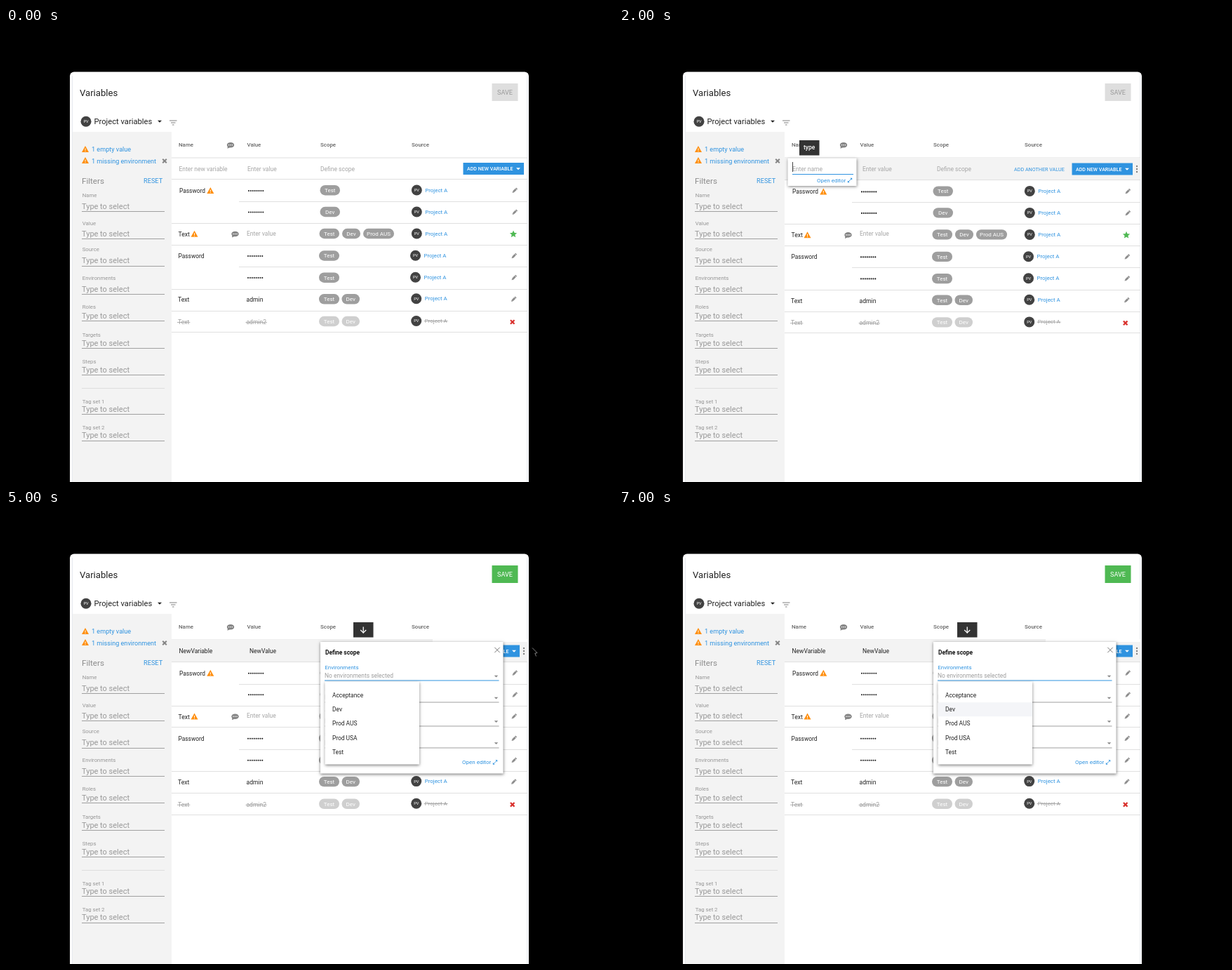
Animation, 865 px wide and 647 px high, one loop 8000 ms. Source, as an HTML page with a canvas:

```html
<!DOCTYPE html>
<html lang="en">
<head>
<meta charset="utf-8">
<title>Variables editor</title>
<style>
html, body { margin: 0; width: 100%; height: 100%; overflow: hidden; background: #000; }
canvas { display: block; }
</style>
</head>
<body>
<canvas id="stage" width="865" height="647"></canvas>
<script>
const ctx = document.getElementById('stage').getContext('2d');
const BLUE = '#2f93e0', GREEN = '#4fb953', ORANGE = '#ff8f0f', RED = '#d9302c';
const INK = '#222', GREY = '#9e9e9e', HINT = '#a6a6a6', RULE = '#e0e0e0', DARK = '#424242';
const STEP = 1000, STEPS = 8;

// y is the middle of the capitals
function text(str, x, y, size, color, { weight = 400, align = 'left', strike = false } = {}) {
  ctx.font = `${weight} ${size}px Roboto, sans-serif`;
  ctx.textAlign = align;
  ctx.fillStyle = color;
  ctx.fillText(str, x, y + size * 0.35);
  if (strike) rect(x - 1, y, ctx.measureText(str).width + 2, 0.8, color);
}

function rect(x, y, w, h, color) {
  ctx.fillStyle = color;
  ctx.fillRect(x, y, w, h);
}

function rounded(x, y, w, h, r, color) {
  ctx.fillStyle = color;
  ctx.beginPath();
  ctx.roundRect(x, y, w, h, r);
  ctx.fill();
}

function dot(x, y, r, color) {
  ctx.fillStyle = color;
  ctx.beginPath();
  ctx.arc(x, y, r, 0, Math.PI * 2);
  ctx.fill();
}

function trace(points) {
  ctx.beginPath();
  points.forEach(([x, y]) => ctx.lineTo(x, y));
}

function polygon(points, color) {
  ctx.fillStyle = color;
  trace(points);
  ctx.fill();
}

function line(x1, y1, x2, y2, color, width = 1) {
  ctx.strokeStyle = color;
  ctx.lineWidth = width;
  trace([[x1, y1], [x2, y2]]);
  ctx.stroke();
}

function at(x, y, draw) {
  ctx.save();
  ctx.translate(x, y);
  draw();
  ctx.restore();
}

function card(x, y, w, h) {
  ctx.save();
  ctx.shadowColor = 'rgba(0,0,0,.5)';
  ctx.shadowBlur = 4;
  ctx.shadowOffsetY = 1;
  rect(x, y, w, h, '#fff');
  ctx.restore();
}

function caret(x, y, color, w = 6) {
  polygon([[x - w / 2, y - w / 4], [x + w / 2, y - w / 4], [x, y + w / 4]], color);
}

function cross(x, y, r, color, width) {
  line(x - r, y - r, x + r, y + r, color, width);
  line(x + r, y - r, x - r, y + r, color, width);
}

function warning(x, y) {
  polygon([[x, y - 5], [x + 5, y + 4], [x - 5, y + 4]], ORANGE);
  rect(x - 0.5, y - 1.5, 1, 2.7, '#fff');
  rect(x - 0.5, y + 2, 1, 1, '#fff');
}

function comment(x, y) {
  ctx.fillStyle = '#858585';
  ctx.beginPath();
  ctx.ellipse(x, y - 0.5, 5.2, 3.8, 0, 0, Math.PI * 2);
  ctx.fill();
  polygon([[x - 4, y], [x - 1, y + 3], [x - 4.5, y + 4.5]], '#858585');
  for (const dx of [-2.5, 0, 2.5]) dot(x + dx, y - 0.5, 0.8, '#fff');
}

function pencil(x, y) {
  at(x, y, () => {
    ctx.rotate(-Math.PI / 4);
    rect(-2.6, -1.4, 5, 2.8, '#8c8c8c');
    rect(2.8, -1.4, 1.6, 2.8, '#8c8c8c');
    polygon([[-2.6, -1.4], [-2.6, 1.4], [-4.8, 0]], '#8c8c8c');
  });
}

function star(x, y) {
  const points = Array.from({ length: 10 }, (_, i) => {
    const a = i * Math.PI / 5 - Math.PI / 2, r = i % 2 ? 2.5 : 5.4;
    return [x + r * Math.cos(a), y + r * Math.sin(a)];
  });
  polygon(points, GREEN);
}

function badge(x, y) {
  dot(x, y, 7.5, DARK);
  text('PV', x, y, 5.6, '#fff', { align: 'center' });
}

function chip(label, x, y, w, color) {
  rounded(x, y - 7.2, w, 14.4, 7.2, color);
  text(label, x + w / 2, y, 8, '#fff', { align: 'center' });
}

function secret(x, y) {
  for (let i = 0; i < 8; i++) dot(x + 1 + i * 2.9, y, 1.05, INK);
}

function openEditor(x, y) {
  text('Open editor', x, y, 8, BLUE);
  at(x + 47, y, () => {
    line(-2.5, 2.5, 2.5, -2.5, BLUE, 0.9);
    polygon([[3.2, -3.2], [3.2, -0.4], [0.4, -3.2]], BLUE);
    polygon([[-3.2, 3.2], [-3.2, 0.4], [-0.4, 3.2]], BLUE);
  });
}

// Black arrow with a thin light rim on its right side
function pointer(x, y) {
  at(x, y, () => {
    const rim = [[1, 0.5], [8, 7.6], [4.8, 8.2], [6.5, 12.5]];
    polygon([[0.5, 0.5], ...rim, [4.8, 13.2], [3.1, 9], [0.5, 11.3]], '#000');
    trace(rim);
    ctx.strokeStyle = '#bbb';
    ctx.lineWidth = 0.7;
    ctx.stroke();
  });
}

function key(label, x, y = 160) {
  rect(x, y, 28.5, 21.5, '#333');
  if (label !== 'down') {
    text(label, x + 14.2, y + 10.5, 8.5, '#fff', { weight: 500, align: 'center' });
    return;
  }
  const cx = x + 14.2, cy = y + 11;
  line(cx, cy - 4.5, cx, cy + 4, '#fff', 1.3);
  line(cx - 4, cy, cx + 0.4, cy + 4.4, '#fff', 1.3);
  line(cx + 4, cy, cx - 0.4, cy + 4.4, '#fff', 1.3);
}

function field(label, labelY, inputY, ruleY) {
  text(label, 108.7, labelY, 7.8, '#969696');
  text('Type to select', 108, inputY, 11, '#999');
  rect(108, ruleY, 118, 1, '#a0a0a0');
}

function sidebar() {
  rect(95, 148, 141, 499, '#f3f3f3');
  warning(113, 173);
  text('1 empty value', 122, 173, 9.1, BLUE);
  warning(113, 189);
  text('1 missing environment', 122, 189.5, 9.1, BLUE);
  cross(226, 189.5, 2.8, '#858585', 2);
  text('Filters', 108, 218, 11.6, '#8c8c8c');
  text('RESET', 196, 218, 9.2, BLUE);
  field('Name', 238.5, 254, 261);
  field('Value', 278, 293.5, 300);
  field('Source', 315.5, 331.5, 339);
  field('Environments', 356, 372, 379);
  field('Roles', 397.5, 410, 417);
  field('Targets', 437, 449, 456);
  field('Steps', 475, 487.5, 494);
  rect(108, 513, 118, 1, '#dedede');
  field('Tag set 1', 532, 543, 550);
  field('Tag set 2', 569.5, 580.5, 588);
}

function header(changed) {
  text('Variables', 105, 92.5, 13.1, INK);
  rect(692.5, 79, 37, 25, changed ? GREEN : '#dedede');
  text('SAVE', 711, 91.5, 9.1, changed ? '#fff' : '#999', { align: 'center' });
  badge(114, 133.3);
  text('Project variables', 125.5, 133, 11.2, INK);
  caret(219, 133.3, INK);
  rect(233, 131.5, 10.5, 1, '#808080');
  rect(235, 134.5, 6.5, 1, '#808080');
  rect(237, 137.5, 2.5, 1, '#808080');
}

function columns() {
  const style = { weight: 500 };
  text('Name', 246, 166.5, 7.9, '#666', style);
  comment(320, 167.3);
  text('Value', 343.5, 166.5, 7.9, '#666', style);
  text('Scope', 448, 166.5, 7.9, '#666', style);
  text('Source', 578, 166, 8, '#666', style);
}

function addButton(x, y) {
  rect(x, y, 86.5, 17, BLUE);
  text('ADD NEW VARIABLE', x + 5.5, y + 8.6, 7.1, '#fff', { weight: 500 });
  caret(x + 78.5, y + 8.7, '#fff');
}

function entryRow(step) {
  rect(236, 184.5, 507, 1, RULE);
  if (step < 2) {
    text('Enter new variable', 246.5, 201, 8.5, HINT);
    text('Enter value', 344, 201, 8.5, HINT);
    text('Define scope', 448, 201, 8.5, HINT);
    addButton(651.5, 192);
    rect(236, 215, 507, 1, RULE);
    return;
  }
  rect(236, 185, 507, 31.5, '#f3f3f3');
  if (step > 4) rect(608, 184, 135, 4, '#fff');
  rect(236, 216, 507, 1, RULE);
  if (step > 2) text('NewVariable', 246.5, 201.5, 8.5, INK);
  if (step > 3) text('NewValue', 347, 201.5, 8.5, INK);
  else text('Enter value', 347, 201.5, 8.5, HINT);
  text('Define scope', 453, 201.5, 8.5, HINT);
  text('ADD ANOTHER VALUE', 563, 201.5, 7.2, BLUE);
  addButton(645.5, 192.5);
  for (const y of [197, 201, 205]) dot(738, y, 1.2, '#808080');
}

function source(x, y, removed) {
  badge(x, y);
  text('Project A', x + 12, y - 0.2, 7.9, removed ? GREY : BLUE, { strike: removed });
}

function rows(step) {
  const d = step < 2 ? 0 : step === 2 ? 1.4 : 0.8;
  [247, 278, 308.5, 340, 371.5, 402.5, 433].forEach((y, i) => {
    const x = i === 0 || i === 3 ? 332 : 236;
    rect(x, Math.round(y + d), 743 - x, 1, RULE);
  });
  text('Enter value', 343, 293.5, 8.5, HINT);

  at(0, d, () => {
    text('Password', 247, 232, 8.4, INK);
    warning(291.3, 232);
    secret(345, 232);
    chip('Test', 447.5, 231.2, 28.5, GREY);
    source(585.3, 231);
    pencil(725, 231.5);

    secret(345, 262.5);
    chip('Dev', 447.5, 262, 28.5, GREY);
    source(585.3, 262);
    pencil(725, 262.5);

    text('Text', 245.5, 293.8, 8.6, INK);
    warning(268.5, 293.8);
    comment(326.5, 294);
    chip('Test', 446.5, 293, 28.5, GREY);
    chip('Dev', 479, 293, 26, GREY);
    chip(step === 3 ? 'Chip' : 'Prod AUS', 509, 293, 44, GREY);
    source(585.3, 293);
    if (step < 5) star(723, 293.8); else pencil(724, 293.3);

    text('Password', 245.5, 325, 8.4, INK);
    secret(344, 325);
    chip('Test', 446, 324.5, 29, GREY);
    source(583.5, 324.3);
    pencil(724, 324.8);

    secret(344, 356);
    chip('Test', 446, 355.7, 29, GREY);
    source(583.5, 355.3);
    pencil(724, 355.8);

    text('Text', 245, 387.2, 8.6, INK);
    text('admin', 342.5, 387.2, 8.6, INK);
    chip('Test', 446, 386.3, 29, GREY);
    chip('Dev', 478.5, 386.3, 25.5, GREY);
    source(584.7, 385.8);
    pencil(723.5, 386.5);

    text('Text', 245, 419, 8.6, GREY, { strike: true });
    text('admin2', 342.5, 419, 8.5, GREY, { strike: true });
    chip('Test', 446, 418, 29, '#cfcfcf');
    chip('Dev', 478.5, 418, 25.5, '#cfcfcf');
    source(584.7, 417.5, true);
    cross(721.7, 419, 2.8, RED, 2.2);
  });
}

function inputCard(x, h, hint) {
  card(x, 185.5, 98, h);
  text(hint, x + 6.5, 201.5, 8.5, HINT);
  rect(x + 6.5, 208, 87, 1, BLUE);
  rect(x + 6.5, 191, 1, 14, '#444');
}

function scopeCard() {
  card(448, 185.5, 260.5, 187.5);
  text('Define scope', 455, 201, 8.4, '#111', { weight: 700 });
  cross(700, 197, 3.7, '#666', 0.9);
  [['Environments', 221.5], ['Roles', 252.5], ['Targets', 286], ['Steps', 317]].forEach(([name, y], i) => {
    text(name, 454.3, y, 7.9, i ? '#8c8c8c' : BLUE);
    text(`No ${name.toLowerCase()} selected`, 454, y + 12.5, 8.45, GREY);
    rect(454, Math.round(y + 18.5), 248.5, 1, i ? '#a0a0a0' : BLUE);
    caret(698.5, y + 13, '#888', 5.5);
  });
  openEditor(650, 357);
}

function menu(active) {
  card(454.5, 244.5, 134.5, 118);
  ['Acceptance', 'Dev', 'Prod AUS', 'Prod USA', 'Test'].forEach((name, i) => {
    const y = 264 + i * 20.25;
    if (i === active) rect(454.5, y - 10, 134.5, 20, '#f4f5f8');
    text(name, 465, y, 8.4, INK);
  });
}

function overlay(step) {
  if (step === 1) {
    key('tab', 257, 163);
    pointer(737, 203);
  } else if (step === 2) {
    inputCard(240.5, 39.5, 'Enter name');
    openEditor(282, 217);
    key('type', 257);
  } else if (step === 3) {
    inputCard(341, 58, 'Enter value');
    text('Change type', 433.5, 219.5, 8, BLUE, { align: 'right' });
    openEditor(383.5, 232);
    key('tab', 369);
  } else if (step === 4) {
    scopeCard();
    key('tab', 490);
  } else if (step > 4) {
    at(0, 2.5, scopeCard);
    menu(step - 6);
    key('down', step === 5 ? 495 : 482);
    if (step < 7) pointer(749, 196);
  }
}

function draw(step) {
  rect(0, 0, 865, 647, '#000');
  rounded(91, 62.5, 654, 600, 6, '#fff');
  rect(94, 68, 1, 579, '#e6e9ee');
  rect(742.5, 68, 1, 579, '#dde2ea');
  header(step > 2);
  sidebar();
  columns();
  entryRow(step);
  rows(step);
  overlay(step);
}

function frame() {
  draw(Math.floor(performance.now() / STEP) % STEPS);
  requestAnimationFrame(frame);
}
frame();
</script>
</body>
</html>
```
